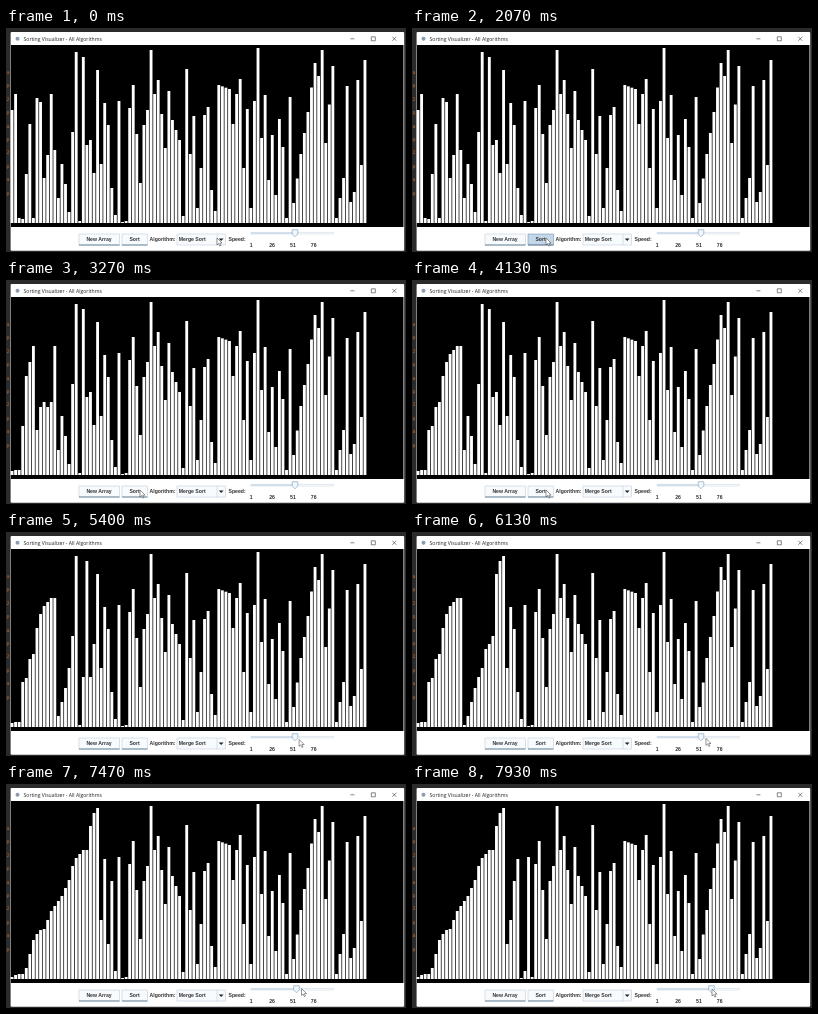
An HTML page for the animation above (8 s loop, 400 px wide and 224 px high).

```html
<!DOCTYPE html>
<html lang="en">
<head>
<meta charset="utf-8">
<title>Sorting Visualizer</title>
<style>
  html, body { margin: 0; width: 100%; height: 100%; overflow: hidden; background: #2b2b2b; }
  svg { display: block; width: 100vw; height: 100vh; }
  .ui { font: bold 5.15px "Liberation Sans", Arial, sans-serif; fill: #333; }
  .title { font: 5.12px "Open Sans", sans-serif; fill: #222; }
  .line { fill: none; stroke: #333; stroke-width: .6; }
  .box { fill: #f8fbfe; stroke: #b4c4d3; stroke-width: .5; }
  .edge { stroke: #4c6c86; stroke-width: .8; }
  .pressed { fill: #c4d7ea; stroke: #63829f; }
  .code { font: 5px "DejaVu Sans Mono", monospace; fill: #b06a35; }
</style>
</head>
<body>
<svg viewBox="0 0 400 224" xmlns="http://www.w3.org/2000/svg">
  <rect width="400" height="224" fill="#2b2b2b"/>
  <g id="code" class="code"></g>
  <rect x="4.6" y="4" width="393.6" height="218.7" rx="1" fill="#fff"/>
  <rect x="5" y="17" width="392.5" height="182" fill="#000"/>

  <circle cx="11.5" cy="10.8" r="2" fill="#8f9bab"/>
  <text class="title" x="17.5" y="12.7">Sorting Visualizer - All Algorithms</text>
  <path class="line" d="M344.4 10.8h4M365.3 8.8h4v4h-4zM386.3 8.8l4 4m0-4l-4 4"/>

  <g id="bars" fill="#fff"></g>

  <rect class="box" x="73" y="206" width="40.5" height="11"/>
  <rect class="box" id="sort" x="116" y="206" width="25.5" height="11"/>
  <path class="edge" d="M73 217h40.5M116 217h25.5"/>
  <rect class="box" x="171" y="206" width="48.5" height="11"/>
  <path d="M211 206v11" stroke="#b4c4d3" stroke-width=".5"/>
  <path d="M212.8 210.4h4.8l-2.4 2.6z" fill="#222"/>
  <g class="ui">
    <text x="80.4" y="213.4">New Array</text>
    <text x="123.4" y="213.4">Sort</text>
    <text x="143.5" y="213.4">Algorithm:</text>
    <text x="172.8" y="213.4">Merge Sort</text>
    <text x="222.5" y="213.4">Speed:</text>
    <g text-anchor="middle" id="ticks"></g>
  </g>
  <rect x="245" y="204.2" width="82.5" height="1.8" fill="#fff" stroke="#c3d1df" stroke-width=".5"/>
  <rect id="fill" x="245" y="204.3" height="1.6" fill="#ccdcec"/>
  <path id="thumb" d="M-2.8 201.7h5.6v4.3l-2.8 2.8l-2.8-2.8z" fill="#f1f6fb" stroke="#7f9cb8" stroke-width=".6"/>
  <path id="mouse" d="M0 0v7l1.6-1.5l1.2 2.6l1.2-.6l-1.2-2.4h2.3z" fill="#fff" stroke="#333" stroke-width=".5"/>
</svg>
<script>
const LOOP = 8000, FLOOR = 195, PITCH = 3.565, _ = null;
const $ = id => document.getElementById(id);
const make = (tag, parent, attrs) => {
  const el = document.createElementNS("http://www.w3.org/2000/svg", tag);
  for (const k in attrs) el.setAttribute(k, attrs[k]);
  return parent.appendChild(el);
};

// Straight line between [position, value, ...] points; column picks the value
function track(keys, at, column = 1) {
  const i = keys.findIndex(key => key[0] > at);
  if (i < 1) return keys[i ? keys.length - 1 : 0][column];
  const a = keys[i - 1], b = keys[i];
  return a[column] + (b[column] - a[column]) * (at - a[0]) / (b[0] - a[0]);
}

// Bar tops at the turns of the skyline; the slopes between them are straight
const turns = [
  82, 66, 190, 191, 146, 96, 190, 70, 74, 150, 127, 66, 122, 170, 136, 156, 184, _, 24, 193,
  29, 117, 112, 145, 42, 136, 75, 97, 160, 187, 73, 194, 193, 80, 57, _, 155, 97, 82, 22,
  66, 52, _, 120, 63, 92, _, 112, 188, 41, 126, 88, 180, 140, 87, 79, 162, 183, 57, _,
  _, 61, 96, 66, 51, 140, 81, 180, 73, 20, 110, 67, 152, 107, 167, 91, 119, 190, 69, 175,
  _, 126, _, 84, _, 35, 48, 22, 115, _, 38, 190, _, 150, 58, 174, 164, 52, 137, 32
];
const points = turns.map((y, i) => [i, y]).filter(p => p[1] !== _);
const tops = turns.map((y, i) => track(points, i));

// Merge sort log: each compared write costs one step, leftovers are free
const log = [];
let step = 0;
function mergeSort(a, lo, hi) {
  if (lo >= hi) return;
  const mid = (lo + hi) >> 1;
  mergeSort(a, lo, mid);
  mergeSort(a, mid + 1, hi);
  const left = a.slice(lo, mid + 1), right = a.slice(mid + 1, hi + 1);
  let k = lo;
  const put = v => { log.push({ step, k, v }); a[k++] = v; };
  while (left.length && right.length) {
    step++;
    put(left[0] >= right[0] ? left.shift() : right.shift());
  }
  [...left, ...right].forEach(put);
}
mergeSort(tops.slice(), 0, tops.length - 1);

const bars = tops.map((y, i) => make("rect", $("bars"), { x: 4.6 + PITCH * i, width: 2.85 }));
for (let i = 0; i < 4; i++)
  make("text", $("ticks"), { x: 245.3 + 20.8 * i, y: 219.4 }).textContent = 1 + 25 * i;
for (let i = 0; i < 10; i++)
  make("text", $("code"), { x: 0.6, y: 46 + i * 13.4 }).textContent = "ap2p"[i % 4];

// The sort runs faster once the slider is dragged, then stalls a little
const pace = [[2003, 0], [4130, 33], [5400, 51], [7270, 87], [LOOP, 95]];
const path = [[70, 211, 210], [200, 197, 209], [470, 197, 209], [930, 134, 210],
  [4470, 134, 210], [5330, 293, 207.5], [7470, 295.5, 204.5], [7930, 300, 205]];
const knob = [[6270, 289], [7470, 290.5], [7930, 299.5]];

function draw(t) {
  const n = Math.floor(track(pace, t) + 0.15);
  const state = tops.slice();
  for (const w of log) if (w.step <= n) state[w.k] = w.v;
  bars.forEach((bar, i) => {
    bar.setAttribute("y", state[i]);
    bar.setAttribute("height", FLOOR - state[i]);
  });
  const x = track(knob, t);
  $("thumb").setAttribute("transform", `translate(${x})`);
  $("fill").setAttribute("width", x - 245);
  $("mouse").setAttribute("transform", `translate(${track(path, t)} ${track(path, t, 2)})`);
  $("sort").classList.toggle("pressed", t >= 2065 && t < 2200);
}

const start = performance.now();
function loop() {
  draw((performance.now() - start) % LOOP);
  requestAnimationFrame(loop);
}
loop();
</script>
</body>
</html>
```
